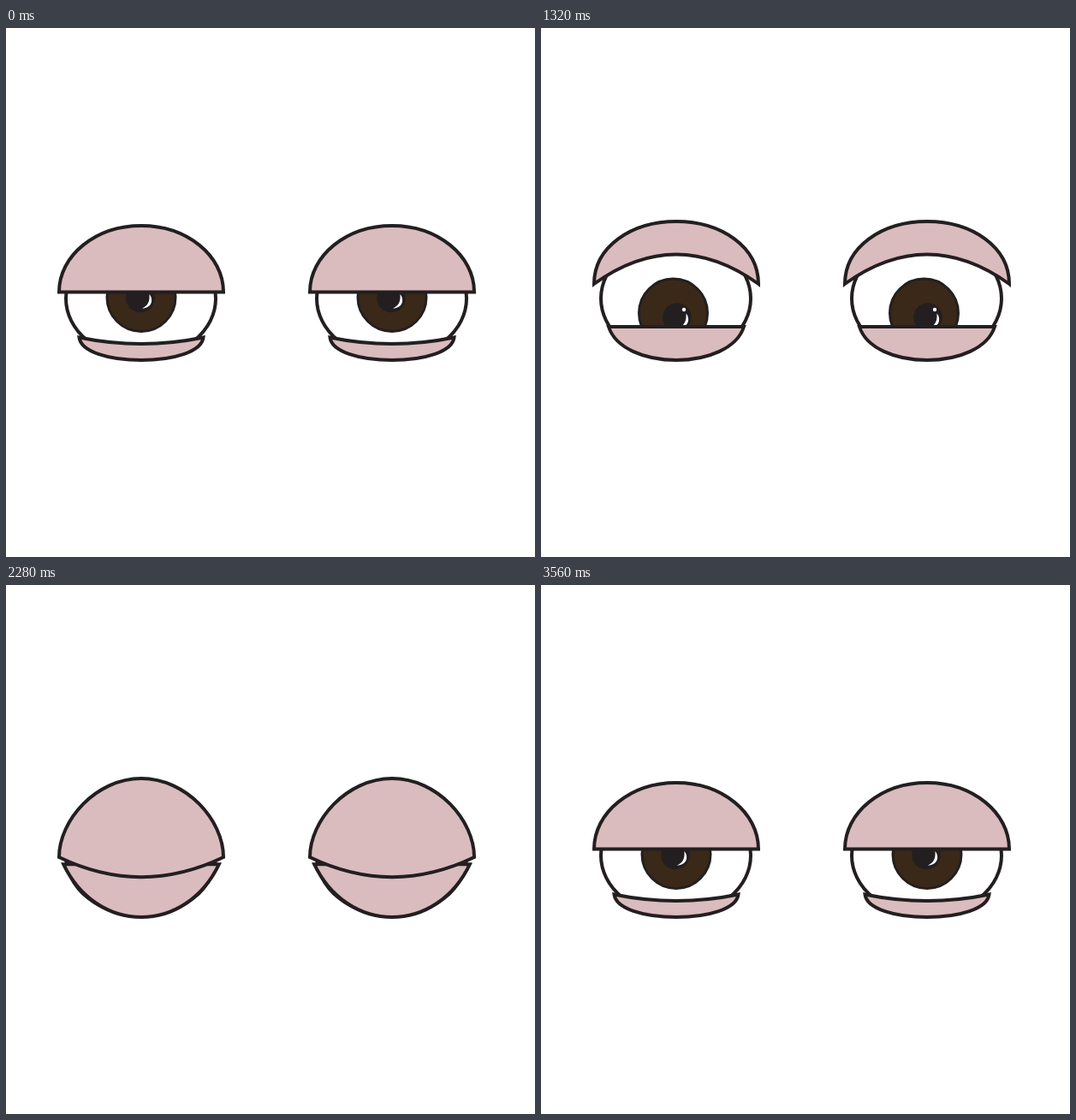
An HTML page with a canvas that plays this animation: 618x618 px, repeating every 3600 ms.

```html
<!DOCTYPE html>
<html lang="en">
<head>
<meta charset="utf-8">
<title>Sleepy eyes</title>
<style>
html, body { margin: 0; width: 100%; height: 100%; overflow: hidden; background: #fff; }
canvas { display: block; width: 618px; height: 618px; }
</style>
</head>
<body>
<canvas id="stage" width="618" height="618"></canvas>
<script>
const ctx = document.getElementById('stage').getContext('2d');
const LOOP = 3600, STEP = 40;
const CENTER = 158, EYE_GAP = 293, BOTTOM = 388;
const INK = '#231f20', SKIN = '#dabcbe', BROWN = '#3a2918';

// Rises from 0 to 1 between two times, bent by a power.
function ramp(time, from, to, power = 1) {
  return Math.min(1, Math.max(0, (time - from) / (to - from))) ** power;
}

// Every part starts at rest, and each phase of the motion shifts it.
function poseAt(time) {
  const glance = ramp(time, 0, 400);
  const drift = ramp(time, 400, 1320);
  const startle = ramp(time, 1100, 1320);
  const close = ramp(time, 1320, 2040);
  const droop = close ** 1.25;
  const open = ramp(time, 2200, 2720, 2);
  const settle = ramp(time, 2720, 3560, 0.7);
  const irisX = 158 - 22.5 * glance + 19 * drift + 2.5 * close + settle;
  const irisY = 314.5 + 11.5 * glance + 7 * drift - 8 * close - 8 * open - 2.5 * settle;
  return {
    irisX, irisY,
    pupilX: irisX - 1 - 6.5 * glance + 12 * drift + 1.5 * close - open - 6 * settle,
    pupilY: irisY + 1 + 3 * glance + drift - 4 * settle,
    top: 231 - 5 * (startle - settle),
    upper: 308.5 - 8 * glance - 1.5 * startle + 19 * droop - 9.5 * settle,
    sag: -34.5 * startle + 58.5 * droop - 36 * open + 12 * settle,
    lower: 361.5 - 4.5 * glance - 8 * drift - 23.5 * close + 36 * open
  };
}

function paint(fill, lineWidth) {
  ctx.fillStyle = fill;
  ctx.fill();
  if (!lineWidth) return;
  ctx.lineWidth = lineWidth;
  ctx.strokeStyle = INK;
  ctx.stroke();
}

function oval(x, y, rx, ry, fill, lineWidth) {
  ctx.beginPath();
  ctx.ellipse(x, y, rx, ry, 0, 0, Math.PI * 2);
  paint(fill, lineWidth);
}

function pupil(x, y) {
  oval(x, y, 16.8, 16.8, INK);
  oval(x + 8, y - 9, 2.2, 2.2, '#fff');
  ctx.beginPath();
  ctx.moveTo(x + 10.5, y - 4.5);
  ctx.bezierCurveTo(x + 16, y + 2, x + 13, y + 12, x + 2, y + 12);
  ctx.bezierCurveTo(x + 9, y + 9, x + 11, y + 4, x + 10.5, y - 4.5);
  paint('#fff');
}

// A symmetric lid: an outer curve over its far point, closed by a sagging edge.
function lid(half, corner, far, handle, sideX, sideY, sag) {
  const l = CENTER - half, r = CENTER + half;
  ctx.beginPath();
  ctx.moveTo(l, corner);
  ctx.bezierCurveTo(l + sideX, sideY, CENTER - handle, far, CENTER, far);
  ctx.bezierCurveTo(CENTER + handle, far, r - sideX, sideY, r, corner);
  ctx.quadraticCurveTo(CENTER, corner + sag * 2, l, corner);
  ctx.closePath();
  paint(SKIN, 4);
}

function lowerLid(corner) {
  const raised = 361.5 - corner;
  const sideY = corner + (BOTTOM - corner) * 0.64;
  lid(72.5 + raised * 0.52, corner, BOTTOM, 37, 2 + raised * 0.48, sideY, Math.max(0, 7.5 - raised * 1.7));
}

function eye(pose) {
  oval(157.5, 316, 87.5, 70, '#fff', 4);
  oval(pose.irisX, pose.irisY, 40, 40, BROWN, 3);
  pupil(pose.pupilX, pose.pupilY);
  lowerLid(pose.lower);
  lid(96, pose.upper, pose.top, 53, 0, pose.upper - 43, pose.sag);
}

function draw() {
  const time = Math.floor(performance.now() % LOOP / STEP) * STEP;
  const pose = poseAt(time);
  ctx.fillStyle = '#fff';
  ctx.fillRect(0, 0, 618, 618);
  for (const x of [0, EYE_GAP]) {
    ctx.save();
    ctx.translate(x, 0);
    eye(pose);
    ctx.restore();
  }
  requestAnimationFrame(draw);
}
draw();
</script>
</body>
</html>
```
